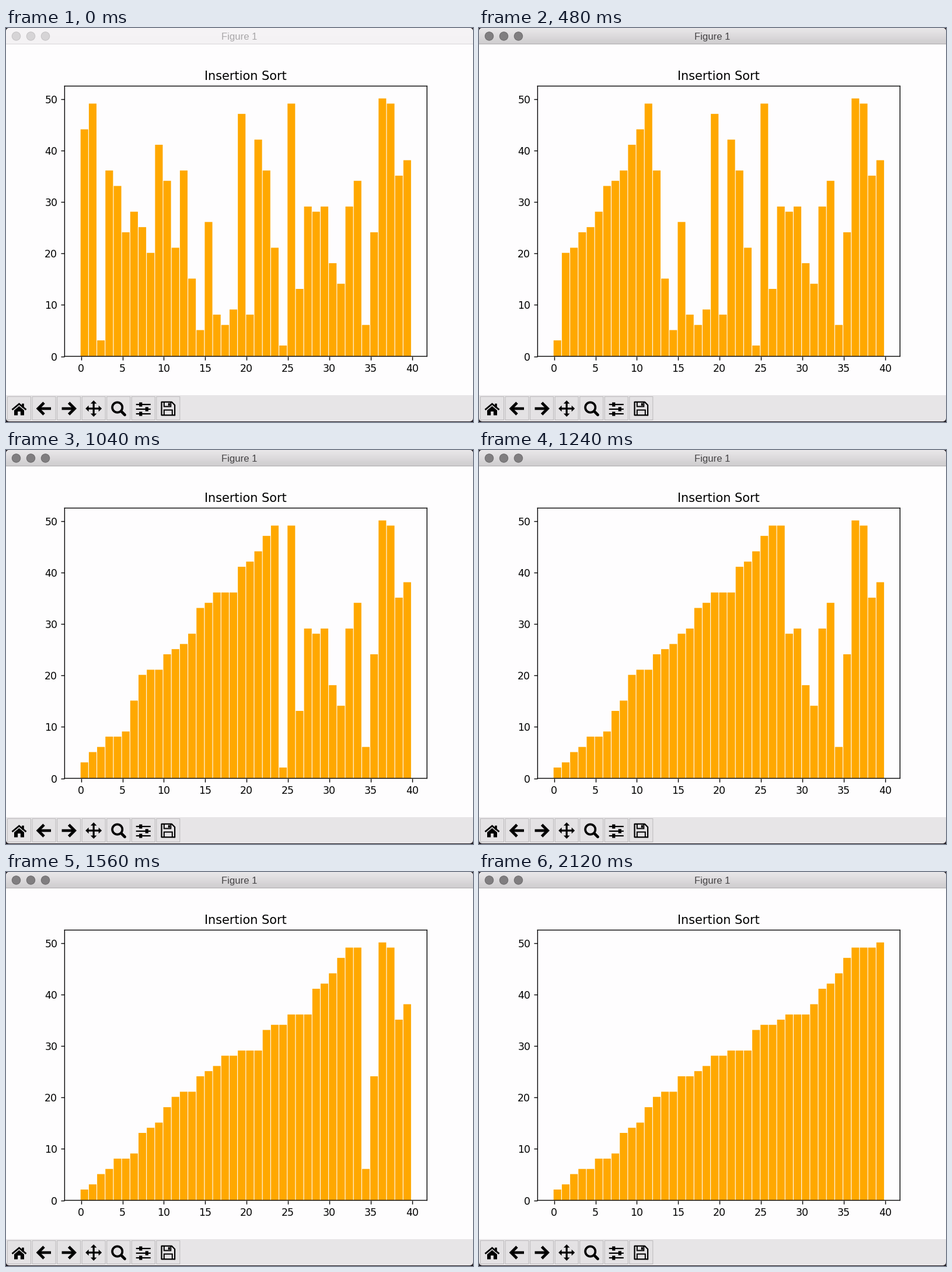
A matplotlib script for the animation above (2160 ms loop, 800 by 675 pixels).

```python
import numpy as np
import matplotlib.pyplot as plt
from matplotlib.animation import FuncAnimation
from matplotlib.colors import to_rgb
from matplotlib.patches import Circle, FancyBboxPatch, Polygon, Rectangle

W, H, DPI = 800, 675, 125
FRAMES, INTERVAL = 54, 40
PAPER, TOOLBAR, INK, ORANGE = "#fefdfe", "#e7e5e7", "black", "#ffa800"

# The numbers being sorted
VALUES = [44, 49, 3, 36, 33, 24, 28, 25, 20, 41, 34, 21, 36, 15, 5, 26, 8, 6, 9, 47,
          8, 42, 36, 21, 2, 49, 13, 29, 28, 29, 18, 14, 29, 34, 6, 24, 50, 49, 35, 38]

plt.rcParams["path.snap"] = False
fig = plt.figure(figsize=(W / DPI, H / DPI), dpi=DPI, facecolor="#1d171e")
ui = fig.add_axes([0, 0, 1, 1])
ui.axis("off")


def px(n):
    """Pixels to points."""
    return n * 72 / DPI


# Shapes take a centre and points as complex numbers, x + y*1j with y down.
def box(c, w, h, color, edge="none", lw=0, z=1):
    patch = Rectangle((c.real - w / 2, c.imag - h / 2), w, h, facecolor=color,
                      edgecolor=edge, linewidth=px(lw), zorder=z)
    return ui.add_patch(patch)


def poly(c, pts):
    pts = c + np.array(pts)
    ui.add_patch(Polygon(np.c_[pts.real, pts.imag], facecolor=INK, edgecolor="none"))


def stroke(c, pts, width, style="miter"):
    pts = c + np.array(pts)
    cap = "round" if style == "round" else "butt"
    ui.plot(pts.real, pts.imag, color=INK, lw=px(width),
            solid_capstyle=cap, solid_joinstyle=style)


def chevron(w, h):
    """Two legs from a tip at the origin that points left."""
    return np.array([w - h * 1j, 0, w + h * 1j])


def mirror(half):
    half = np.array(half)
    return np.r_[half, -half[::-1].conj()]


def home(c):
    stroke(c, chevron(10, 12) * 1j - 8j, 2.8)
    box(c + 6.5 - 5j, 3.6, 7, INK)
    poly(c, mirror([-4.2j, 8.5 + 3j, 8.5 + 11.5j, 2.4 + 11.5j, 2.4 + 5j]))


def arrow(turn):
    def draw(c):
        stroke(c, np.array([-10, 12]) * turn, 4.6)
        stroke(c, (chevron(10, 10) - 10) * turn, 4.8)
    return draw


def move(c):
    for k in range(4):
        turn = 1j ** k
        stroke(c, [0, -10 * turn], 3.2)
        poly(c, (chevron(5.5, 5.3) - 14) * turn)


def zoom(c):
    ring = 8.6 * np.exp(1j * np.linspace(0, 2 * np.pi, 60))
    stroke(c - 2 - 2j, ring, 3.8)
    stroke(c, np.array([5, 10.8]) * (1 + 1j), 4.8, "round")


def sliders(c):
    for row in (-1, 0, 1):
        line = c + (1 + 8 * row) * 1j
        knob = line + (6 if row == 0 else -4.5)
        stroke(line, [-12.5, 12.5], 2.2)
        box(knob, 8, 6, TOOLBAR)
        box(knob, 5.2, 7.2, INK)


def disk(c):
    r, cut = 11.3, 5.3
    corners = r * (1 + 1j) * 1j ** np.arange(4)
    stroke(c, [*corners[:3], r - cut - r * 1j, r - (r - cut) * 1j, corners[0]],
           2.2, "round")
    for w, mid, depth in [(7, 0, 8.5), (5.75, -1.25, -7.5)]:
        edge = 1j * np.copysign(11, depth)
        stroke(c + mid, mirror([w + edge, w + edge - depth * 1j]), 2)
    box(c + 1.5 - 7.2j, 3, 4.5, INK)


def gradient(top, bottom):
    mix = np.linspace(0, 1, 27)[:, None, None]
    return np.array(to_rgb(top)) * (1 - mix) + np.array(to_rgb(bottom)) * mix


# Window frame
window = FancyBboxPatch((6, 6), W - 12, H - 13, boxstyle="round,pad=6,rounding_size=6",
                        facecolor=TOOLBAR, edgecolor="none", zorder=0)
ui.add_patch(window)
box(400 + 328.5j, W, 601, PAPER, z=0.5)

ACTIVE = gradient("#e9e7e9", "#cfcdcf")
IDLE = gradient("#f6f4f6", "#f4f2f4")
header = ui.imshow(IDLE, extent=(0, W, 27, 0), aspect="auto",
                   interpolation="nearest", zorder=0.6)
header.set_clip_path(window)
header_edge = box(400 + 27.5j, W, 1, INK, z=0.7)
lights = [ui.add_patch(Circle((17.5 + 25 * i, 14), 7.2, lw=px(1))) for i in range(3)]
caption = ui.text(400, 20, "Figure 1", ha="center", va="baseline",
                  family="Liberation Sans", size=px(16.6))

for i, icon in enumerate([home, arrow(1), arrow(-1), move, zoom, sliders, disk]):
    centre = 22.5 + 42.55 * i + 652j
    box(centre - 0.5j, 40, 40, "#e4e2e4", "#bbb9bb", 1)
    icon(centre)

ui.set_xlim(0, W)
ui.set_ylim(H, 0)

# Chart
chart = fig.add_axes([100.4 / W, 1 - 562.5 / H, 620.8 / W, 463 / H], facecolor=PAPER)
bars = chart.bar(range(len(VALUES)), VALUES, align="edge",
                 color=ORANGE, edgecolor=ORANGE, linewidth=1)
chart.set_title("Insertion Sort")


def style_header(active):
    header.set_data(ACTIVE if active else IDLE)
    header_edge.set_facecolor("#aeacae" if active else "#d8d6d8")
    caption.set_color("#454345" if active else "#a9a7a9")
    for light in lights:
        light.set_facecolor("#807e80" if active else "#d6d4d6")
        light.set_edgecolor("#6c6a6c" if active else "#c4c2c4")


def update(n):
    style_header(n > 0)
    done = int((n + 2.1) / 1.22) + 1  # one insertion every 1.22 ticks
    heights = sorted(VALUES[:done]) + VALUES[done:]
    for bar, h in zip(bars, heights):
        bar.set_height(h)
    return list(bars)


anim = FuncAnimation(fig, update, frames=FRAMES, interval=INTERVAL,
                     init_func=lambda: update(0), repeat=True, repeat_delay=0)
plt.show()
```
